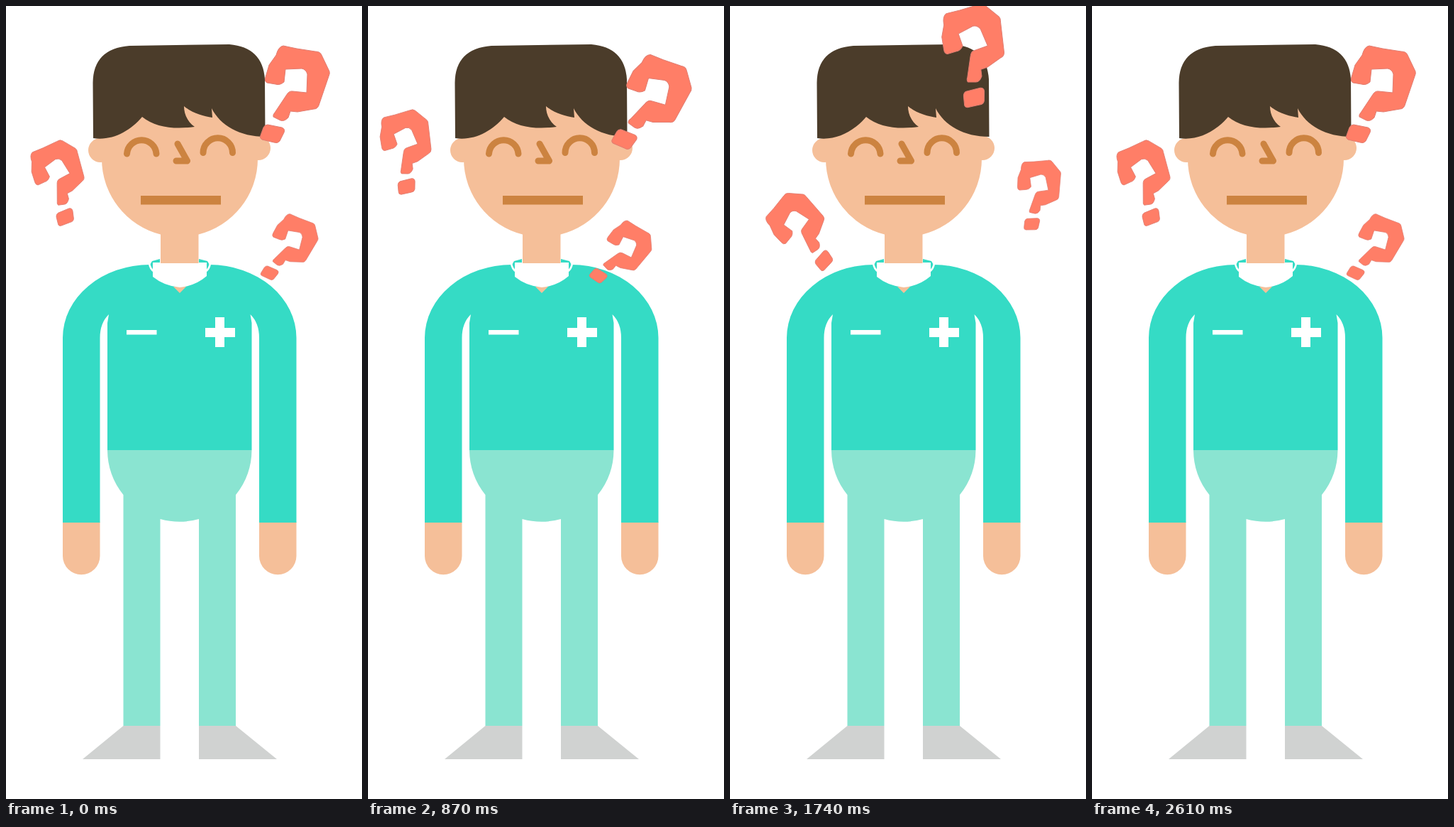
These frames come from a looping animation (502x1116 px, 3340 ms). An HTML page:

```html
<!DOCTYPE html>
<html lang="en">
<head>
<meta charset="utf-8">
<title>Puzzled nurse</title>
<style>
html, body { margin: 0; width: 100%; height: 100%; overflow: hidden; background: #fff; }
svg { display: block; width: 100%; height: 100%; }
.skin { fill: #f5bf99; }
.teal { fill: #35dbc5; }
.mint { fill: #8ae4d1; }
.shoe { fill: #d0d2d1; }
.hair { fill: #4b3c2a; }
.white { fill: #fff; }
.line { fill: none; stroke: #cc8340; stroke-width: 9; stroke-linecap: round; stroke-linejoin: round; }
#mark { fill: #ff7e67; stroke: #e17c70; stroke-width: 1; stroke-linejoin: round; }
</style>
</head>
<body>
<svg viewBox="0 0 502 1116">
  <defs>
    <!-- question mark, placed by the centre of its dot -->
    <path id="mark" transform="translate(-376 -180)" d="
      M391 56L410 60L436 64Q443 64 445 69L456 92Q457 95 455 99L441 140Q439 145 434 145L411 149L401 148L398 157
      Q392 163 387 161L377 156Q376 153 379 150L395 126Q399 119 404 120L424 122L425 96Q423 89 417 88L394 89
      L392 107Q386 112 380 110L368 108Q364 106 366 100L371 83L381 69Q384 57 391 56Z
      M369 167L389 171Q394 173 392 178L386 190Q383 194 378 192L361 188Q357 186 359 182L363 171Q365 167 369 167Z"/>
  </defs>

  <!-- legs and shoes -->
  <path class="mint" d="M143 625H346.5A101.7 101.7 0 0 1 324 688V1013H272V722A101.7 101.7 0 0 1 217.500 722V1013H165.500V688A101.700 101.700 0 0 1 143 625Z"/>
  <path class="shoe" d="M165.500 1013H217.500V1060H108ZM272 1013H324L382 1060H272Z"/>

  <!-- hands, arms and shirt -->
  <path class="skin" d="M80 726H132.500V774A26.200 26.200 0 0 1 80 774ZM357 726H409.500V774A26.200 26.200 0 0 1 357 774Z"/>
  <path class="teal" d="M80 727V467A123 103 0 0 1 203 364L206 359L217 356V364H272V356L284 359L287 364A123 103 0 0 1 409.500 467V727H357V467Q357 446 344.500 434L346.500 446V625H143V446L145 434Q132.500 446 132.500 467V727Z"/>
  <path class="skin" d="M236 395H254L245 404Z"/>
  <path class="white" d="M207 361H283V380Q267 394 245 396Q223 394 207 381ZM170 456H212.500V462.500H170ZM295 438H308V453H323V466H308V480H295V466H281V453H295Z"/>
  <path d="M202 362Q203 370 209 374M288 362Q287 370 281 374" fill="none" stroke="#fff" stroke-width="2.500"/>

  <!-- head -->
  <circle class="skin" cx="133" cy="203" r="17"/>
  <circle class="skin" cx="356" cy="200" r="17"/>
  <path class="skin" d="M135 130H355V215A110 110 0 0 1 271.500 321.500V362H218V321.500A110 110 0 0 1 135 215Z"/>
  <path class="hair" d="M123 186L122.500 108Q123 60 174 56L315 54Q362 58 365 103L365.500 184C330 184 302 168 290 144L291 157C278 155 263 151 251 141C251 152 256 163 266 170C238 174 210 171 192 156C175 176 150 190 123 186Z"/>
  <path class="line" d="M170.500 208A20.800 20.800 0 0 1 212 208M278 206.500A20.700 20.700 0 0 1 319.500 206.500M242 194L255.500 218H240"/>
  <path fill="#cc8340" d="M190 267H303V279.500H190Z"/>

  <use href="#mark"/>
  <use href="#mark"/>
  <use href="#mark"/>
</svg>
<script>
const STEP = 870, LOOP = 3340;
// each mark: scale, then [x, y, angle] for every pose
const marks = [
  { size: 1, poses: [[376, 180, 0], [362, 188, 10], [345, 129, -25.5]] },
  { size: .82, poses: [[84, 297, -34], [55, 254, -25.5], [133, 358, -60]] },
  { size: .705, poses: [[372, 376, 12], [325, 380, 21], [426, 307, -14]] }
];
const uses = document.querySelectorAll("use");

function draw(now) {
  const pose = Math.floor(now % LOOP / STEP) % 3;
  marks.forEach(({ size, poses }, i) => {
    const [x, y, angle] = poses[pose];
    uses[i].setAttribute("transform", `translate(${x} ${y}) rotate(${angle}) scale(${size})`);
  });
}

let start;
function tick(now) {
  start ??= now;
  draw(now - start);
  requestAnimationFrame(tick);
}
draw(0);
requestAnimationFrame(tick);
</script>
</body>
</html>
```
